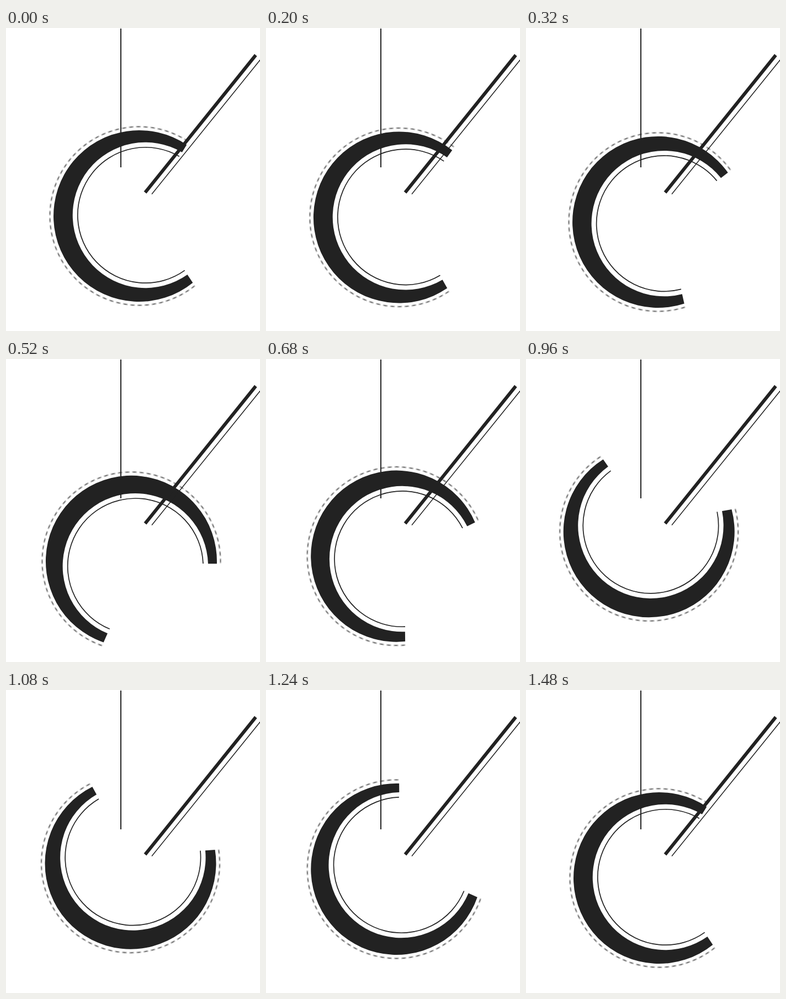
Write an HTML page that moves like this. It is 460x548 px and loops after 1.56 s.

```html
<!DOCTYPE html>
<html lang="en">
<head>
<meta charset="utf-8">
<title>Swinging C</title>
<style>
  html, body { margin: 0; width: 100%; height: 100%; overflow: hidden; background: #fff; }
  svg { display: block; width: 460px; height: 548px; fill: none; stroke: #222; }
  .body { fill: #222; stroke: none; }
  .thin { stroke-width: 1.5; }
  .ring { stroke-width: 1.7; }
  .dash { stroke: #c4c4c4; stroke-width: 3; stroke-dasharray: 9 4; }
  .core { stroke: #808080; stroke-width: 2; stroke-dasharray: 5 8; stroke-dashoffset: -2; }
</style>
</head>
<body>
<svg viewBox="0 0 460 548">
  <g id="swing">
    <path class="dash" d="M330.1 205.3A161.5 161.5 0 1 0 342.2 465.9"/>
    <path class="core" d="M330.1 205.3A161.5 161.5 0 1 0 342.2 465.9"/>
    <path class="body" d="M327.2 211.2A155 155 0 1 0 338.3 460.7L328.5 446A131.7 131.7 0 1 1 318.9 224.8Z"/>
    <path class="ring" d="M313.8 232.2A122.7 122.7 0 1 0 323.7 438.4"/>
  </g>
  <path stroke-width="2" d="M208 1V252"/>
  <path stroke-width="6" d="M452.3 49L252 297.5"/>
  <path class="thin" d="M264 300.5L462 55.5"/>
</svg>
<script>
  const LOOP = 1560, STEP = 40;
  const PIVOT = '210.6 340.2';
  const swing = document.getElementById('swing');

  // [time in ms, angle in degrees]
  const keys = [
    [120, 0], [320, 21], [520, 57.8], [572, 63.5], [680, 33], [840, -20.2],
    [1005, -72.5], [1080, -60.3], [1240, -32], [1400, 6.5], [1480, 0]
  ];

  const rate = i => (keys[i + 1][1] - keys[i][1]) / (keys[i + 1][0] - keys[i][0]);

  // Tangent of the parabola through a key and its neighbours
  const slopes = keys.map(([t], i) => {
    if (i === 0 || i === keys.length - 1) return 0;
    const before = t - keys[i - 1][0], after = keys[i + 1][0] - t;
    return (rate(i - 1) * after + rate(i) * before) / (before + after);
  });

  function angleAt(t) {
    if (t <= keys[0][0] || t >= keys[keys.length - 1][0]) return 0;
    const i = keys.findIndex(k => k[0] > t) - 1;
    const [t0, a0] = keys[i], [t1, a1] = keys[i + 1];
    const h = t1 - t0, u = (t - t0) / h, v = 1 - u;
    return v * v * ((1 + 2 * u) * a0 + u * h * slopes[i]) +
           u * u * ((1 + 2 * v) * a1 - v * h * slopes[i + 1]);
  }

  const start = performance.now();

  function draw() {
    const t = (performance.now() - start) % LOOP;
    const angle = angleAt(Math.floor(t / STEP) * STEP);
    swing.setAttribute('transform', `rotate(${angle.toFixed(2)} ${PIVOT})`);
    requestAnimationFrame(draw);
  }
  draw();
</script>
</body>
</html>
```
